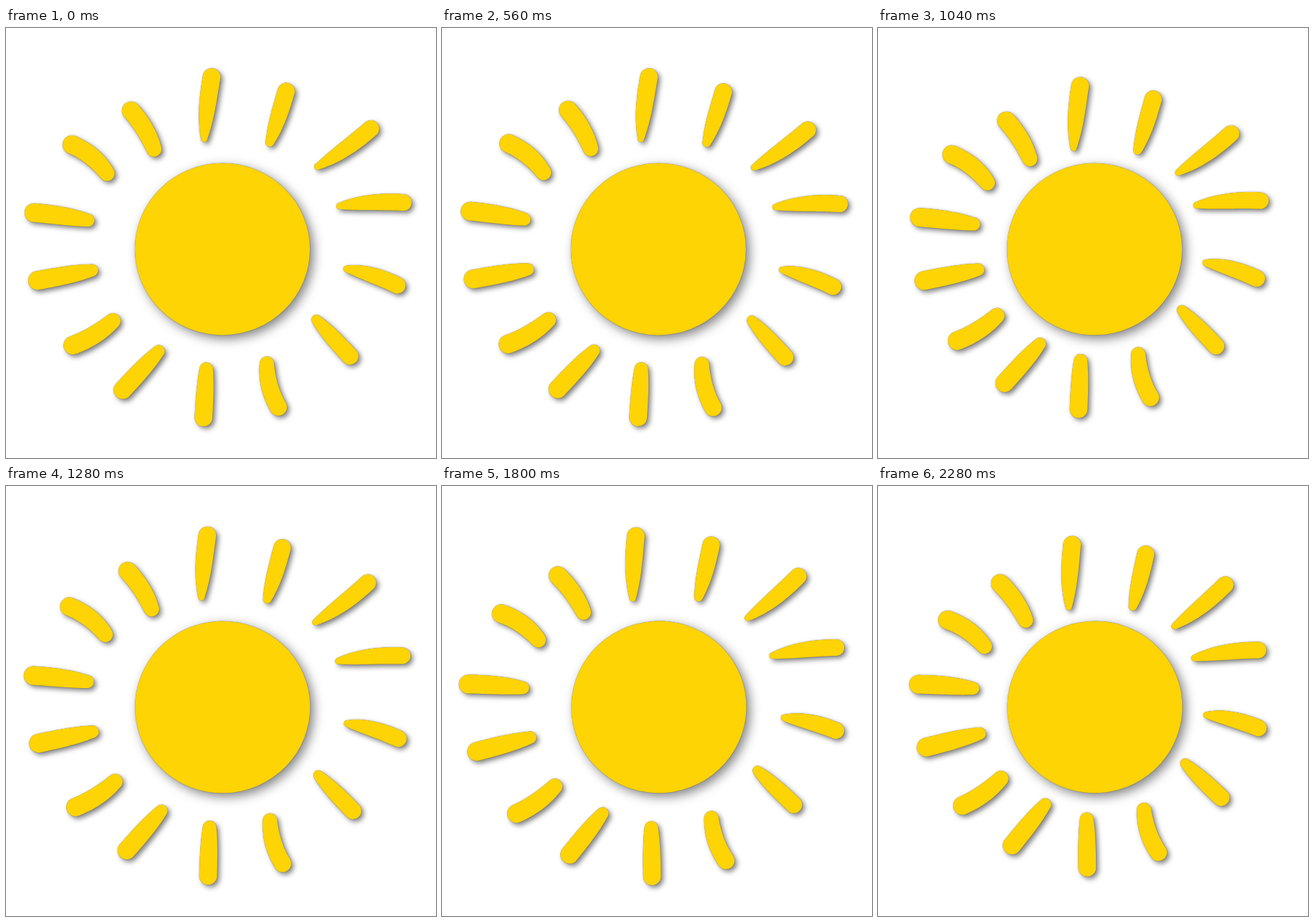
Write an HTML page with a canvas that moves like this. It is 600 px wide and 600 px high and loops after 2.32 s.

```html
<!DOCTYPE html>
<html lang="en">
<head>
<meta charset="utf-8">
<title>Sun</title>
<style>
html, body { margin: 0; width: 100%; height: 100%; overflow: hidden; background: #fff; }
canvas { display: block; }
</style>
</head>
<body>
<canvas width="600" height="600"></canvas>
<script>
const ctx = document.querySelector('canvas').getContext('2d');
const LOOP = 2320, TICK = 40, TURN = 2 * Math.PI;

// outer end, inner end, sideways bend
const rays = [
  [287, 68.5, 276.5, 155, 1],
  [391, 88.5, 368.3, 159.5, -.5],
  [509, 140.5, 434.5, 193.5, -2.3],
  [554.5, 243.5, 465, 248.5, 2.5],
  [546, 359, 475, 336, 2.7],
  [480, 458, 433, 407, 0],
  [380, 529, 364, 468.5, -4.2],
  [275.7, 543.5, 279.5, 476, 0],
  [163, 505, 213, 451, 0],
  [93.3, 442.7, 149.3, 408.5, 3.3],
  [44, 352.3, 120, 338.3, 0],
  [39, 257.7, 114.5, 268.3, -1],
  [92, 162.8, 141, 203, -4.6],
  [174.5, 115.3, 206.5, 169, -3]
];
// Degrees held in each pose
const tilts = [0, .3, .5, .45, -.2, -.9, -1.5, -5.8, -4.1, -4.7, -3.85];

// A curved, tapering capsule of overlapping discs, drawn along its own axis
function addRay([x, y, tipX, tipY, bend], inward) {
  const dx = tipX - x, dy = tipY - y, length = Math.hypot(dx, dy);
  const side = 300 - x;
  const wide = 12.2 + side / 350;
  const thin = Math.min(10.6, Math.max(4.2, (95 - length) / 3 + side / 100));
  const shift = inward * (12 + 8 * (dx / length) ** 2);

  ctx.save();
  ctx.translate(x, y);
  ctx.rotate(Math.atan2(dy, dx));
  for (let t = 0; t <= 1; t += 1 / 64) {
    const px = length * t + shift, py = 4 * bend * t * (1 - t);
    const r = wide + (thin - wide) * t ** 3;
    ctx.moveTo(px + r, py);
    ctx.arc(px, py, r, 0, TURN);
  }
  ctx.restore();
}

function fillWithShadow(offset, blur) {
  ctx.shadowOffsetX = ctx.shadowOffsetY = offset;
  ctx.shadowBlur = blur;
  ctx.fill();
}

function draw(ms) {
  const t = ms % LOOP;
  const inward = Math.floor((t + 160) / 320) % 2;
  const pose = Math.ceil((Math.floor(t / TICK) - .6) / 6.25);

  ctx.resetTransform();
  ctx.clearRect(0, 0, 600, 600);
  ctx.translate(300, 300);
  ctx.rotate(tilts[Math.max(0, pose)] * Math.PI / 180);
  ctx.translate(-300, -300);
  ctx.fillStyle = '#ffd404';
  ctx.shadowColor = 'rgba(0, 0, 0, .5)';

  ctx.beginPath();
  rays.forEach(ray => addRay(ray, inward));
  fillWithShadow(3.5, 7);
  fillWithShadow(0, 1.5);

  ctx.beginPath();
  ctx.ellipse(302, 308.6, 122, 119.8, 0, 0, TURN);
  fillWithShadow(5, 15);
  fillWithShadow(0, 1.5);
}

let start;
function frame(now) {
  start ??= now;
  draw(now - start);
  requestAnimationFrame(frame);
}
requestAnimationFrame(frame);
</script>
</body>
</html>
```
